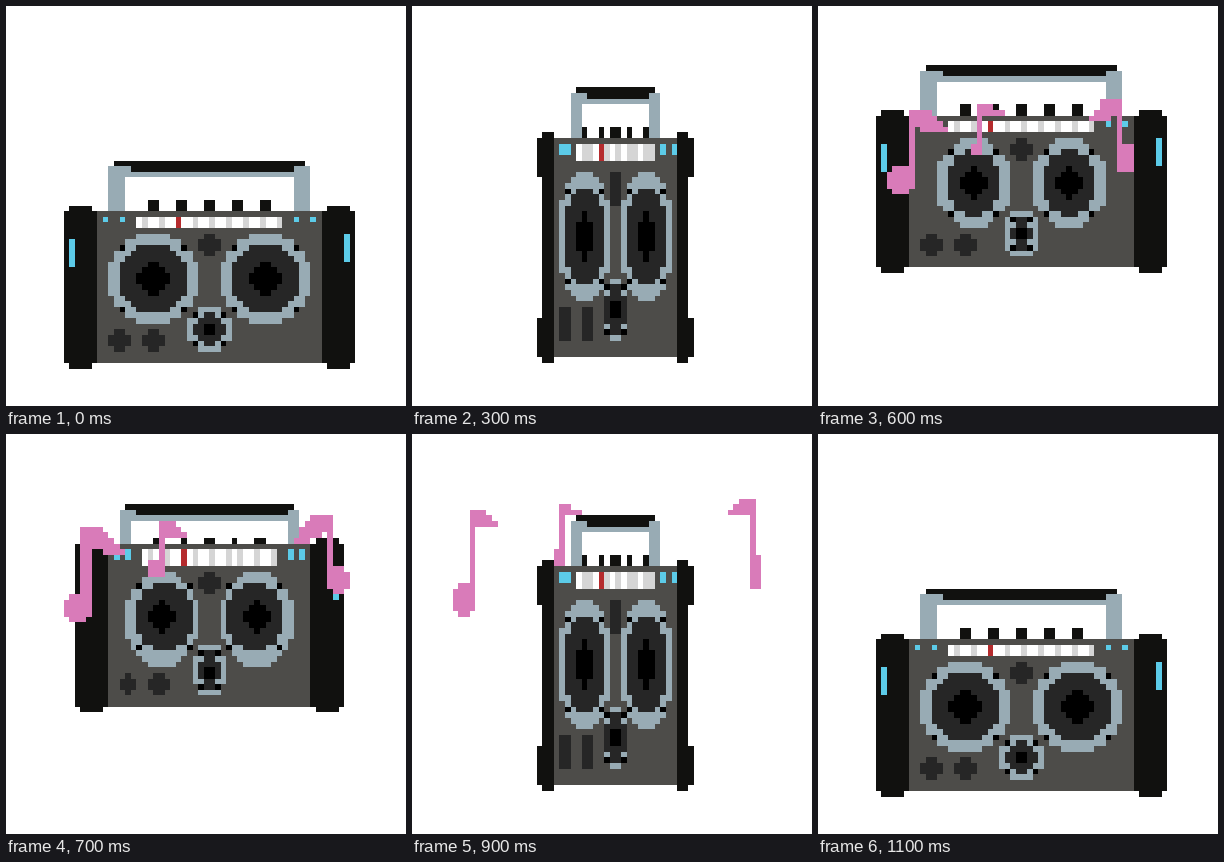
An HTML page for the animation above (1200 ms loop, 400x400 px).

```html
<!DOCTYPE html>
<html lang="en">
<head>
<meta charset="utf-8">
<title>Jumping boombox</title>
<style>
  html, body { margin: 0; width: 100%; height: 100%; overflow: hidden; background: #fff; }
  svg { display: block; width: 100vw; height: 100vh; }
</style>
</head>
<body>
<svg id="stage" viewBox="0 0 400 400" shape-rendering="crispEdges"></svg>
<script>
const STEP = 100, LOOP = 1200;
const INK = '#11110f', CORE = '#000', DARK = '#262626', SHELL = '#4d4c49', SILVER = '#98abb4',
      BLUE = '#5ccbe8', WHITE = '#fff', TICK = '#d5d5d5', RED = '#b52b2d', PINK = '#d97bb9';

// Art-pixel cells to stage pixels.
const px = x => Math.floor(1.9 + x * 5.612);
const py = y => Math.floor(3.13 + y * 5.625);
let out = [];

function box(x0, y0, x1, y1, fill) {
  if (x1 <= x0 || y1 <= y0) return;
  out.push(`<rect x="${px(x0)}" y="${py(y0)}" width="${px(x1) - px(x0)}" height="${py(y1) - py(y0)}" fill="${fill}"/>`);
}

function rounded([x0, y0, x1, y1], fill, inset) {
  const rx = (x1 - x0) / 2, ry = (y1 - y0) / 2;
  for (let y = y0; y < y1; y++) {
    const cut = inset(rx, Math.abs(y + 0.5 - y0 - ry) / ry);
    box(x0 + cut, y, x1 - cut, y + 1, fill);
  }
}
const oval = (b, fill) => rounded(b, fill, (r, d) => Math.floor(r * (1 - Math.sqrt(1 - d * d)) + 0.3));
const diamond = (b, fill) => rounded(b, fill, (r, d) => Math.floor(r * d));

// A pose is the outline the radio is stretched into; cone is the relative speaker width.
const pose = (left, right, top, shoulder, bottom, cone = 1) => ({ left, right, top, shoulder, bottom, cone });
const mix = (a, b, t) => Object.fromEntries(Object.keys(a).map(k => [k, a[k] + (b[k] - a[k]) * t]));

const normal = pose(10, 62, 27, 36, 63);
const squash = pose(4, 67, 33, 43, 63);
const tall = pose(22, 50, 14, 23, 62);
const rise = pose(16, 56, 14, 20, 51);
const apex = pose(10, 62, 10, 19, 46, 0.8125);
const nearApex = mix(rise, apex, 0.6);

function drawRadio(p) {
  const X = x => Math.round(p.left + (x - normal.left) * (p.right - p.left) / 52);
  const Y = y => {
    if (y > 63) return Math.round(p.bottom) + y - 63;
    const rows = y < 36 ? (p.shoulder - p.top) / 9 : (p.bottom - p.shoulder) / 27;
    return Math.round(p.shoulder + (y - 36) * rows);
  };
  const fit = (x0, y0, x1, y1) => {
    const a = X(x0), b = Y(y0);
    return [a, b, Math.max(a + 1, X(x1)), Math.max(b + 1, Y(y1))];
  };
  const part = (x0, y0, x1, y1, fill) => box(...fit(x0, y0, x1, y1), fill);
  const pair = (x0, y0, x1, y1, fill) => {
    part(x0, y0, x1, y1, fill);
    part(72 - x1, y0, 72 - x0, y1, fill);
  };
  // Narrow poses pinch the sides; wide ones make them bulge.
  const waist = Math.round((52 - (p.right - p.left)) / 12);
  const pinch = Math.max(0, waist);

  function handle() {
    const x0 = X(18) + pinch, x1 = X(54) - pinch, y = Y(27), end = Y(36);
    const leg = Math.max(1, X(21) - X(18)), inset = leg > 1 ? 1 : 0;
    box(x0, y + 1, x1, y + 3, SILVER);
    box(x0, y + 1, x0 + leg, end, SILVER);
    box(x1 - leg, y + 1, x1, end, SILVER);
    box(x0 + inset, y, x1 - inset, y + 1, INK);
    box(x0 + leg + 1, y + 1, x1 - leg, y + 2, INK);
  }

  function sides() {
    const x0 = X(10), x1 = X(62), y0 = Y(36), y1 = Y(63);
    const ends = Math.round(pinch * 3.5);
    const shell = (inset, a, b) => {
      box(x0 + inset, a, X(16), b, INK);
      box(X(56), a, x1 - inset, b, INK);
    };
    if (waist < 0) {
      shell(1, y0, y1);
      shell(0, y0 + 2, y1 - 2);
    } else {
      shell(waist, y0, y1);
      shell(0, y0, y0 + ends);
      shell(0, y1 - ends, y1);
    }
    box(X(11), y0 - 1, X(15), y1 + 1, INK);
    box(X(57), y0 - 1, X(61), y1 + 1, INK);
  }

  function cone(cx, cy, rim, screws, core, membraneShape) {
    const around = r => fit(cx - r * p.cone, cy - r, cx + r * p.cone, cy + r);
    oval(around(rim), SILVER);
    const [x0, y0, x1, y1] = around(screws);
    for (const x of [x0, x1 - 1])
      for (const y of [y0, y1 - 1]) box(x, y, x + 1, y + 1, CORE);
    membraneShape(around(screws), DARK);
    diamond(around(core), CORE);
  }

  handle();
  for (let x = 25; x <= 45; x += 5) part(x, 34, x + 2 , 36, INK);
  part(16, 36, 56, 63, SHELL);
  sides();
  if (pinch < 2) {
    part(11, 41, 12, 46, BLUE);
    part(60, 40, 61, 45, BLUE);
  }
  for (const x of [17, 20]) pair(x, 37, x + 1, 38, BLUE);
  part(23, 37, 49, 39, WHITE);
  for (let x = 24; x < 49; x += 3) part(x, 37, x + 1, 39, x === 30 ? RED : TICK);
  for (const [x, y] of [[34, 40], [18, 57], [24, 57]]) diamond(fit(x, y, x + 4, y + 4), DARK);
  cone(34 - 8 * p.cone, 48, 8, 6, 3, oval);
  cone(38 + 8 * p.cone, 48, 8, 6, 3, oval);
  cone(36, 57, 4, 3, 1, diamond);
}

// Notes fly outwards by drift while they grow, then turn edge-on.
const notes = [
  { x: 10, top: 13, height: 19, dir: 1, stem: 2, span: 9, rows: 5, head: [6, 6], drift: 6 },
  { x: 26, top: 12, height: 11, dir: 1, stem: 1, span: 6, rows: 3, head: [3, 3], drift: 2 },
  { x: 61, top: 11, height: 16, dir: -1, stem: 1, span: 8, rows: 5, head: [4, 6], drift: -7 }
];

function drawNote(n, grow, face) {
  const size = 0.8 + 0.2 * grow;
  const x = Math.round(n.x + n.drift * (1 - grow)), y = Math.round(n.top + 5 * (1 - grow));
  const bottom = y + Math.round(n.height * size);
  const stem = Math.max(1, Math.round(n.stem * size * face - 0.2));
  const span = n.span * size * face, rows = Math.round(n.rows * size * face);
  const w = Math.round(n.head[0] * size * face), h = Math.round(n.head[1] * size);
  const across = (u0, u1) => n.dir > 0 ? [x + u0, x + u1] : [x - u1, x - u0];

  const [s0, s1] = across(0, stem);
  box(s0, y, s1, bottom - 1, PINK);
  for (let i = 0; i < rows; i++) {
    const reach = Math.round(span * (0.55 + 0.45 * i / Math.max(1, rows - 1)));
    const [f0, f1] = across(Math.max(0, i - 2) * 2, reach);
    box(f0, y + i, f1, y + i + 1, PINK);
  }
  const [h0, h1] = across(stem - w, stem);
  oval([h0, bottom - h, h1, bottom], PINK);
}

// Each entry: pose, then growth and facing of the notes when they are visible.
const timeline = [
  [normal], [normal], [squash], [tall], [rise], [nearApex],
  [apex, 0, 1], [nearApex, 0.5, 1], [rise, 1, 1], [tall, 1, 0.6], [squash], [normal]
];

const stage = document.getElementById('stage');
const start = performance.now();
let shown = -1;

function render(time) {
  const slot = Math.floor((time % LOOP) / STEP);
  if (slot === shown) return;
  shown = slot;
  out = [];
  const [shape, grow, face] = timeline[slot];
  drawRadio(shape);
  if (face) notes.forEach(n => drawNote(n, grow, face));
  stage.innerHTML = out.join('');
}

function tick() {
  render(performance.now() - start);
  requestAnimationFrame(tick);
}
tick();
</script>
</body>
</html>
```
